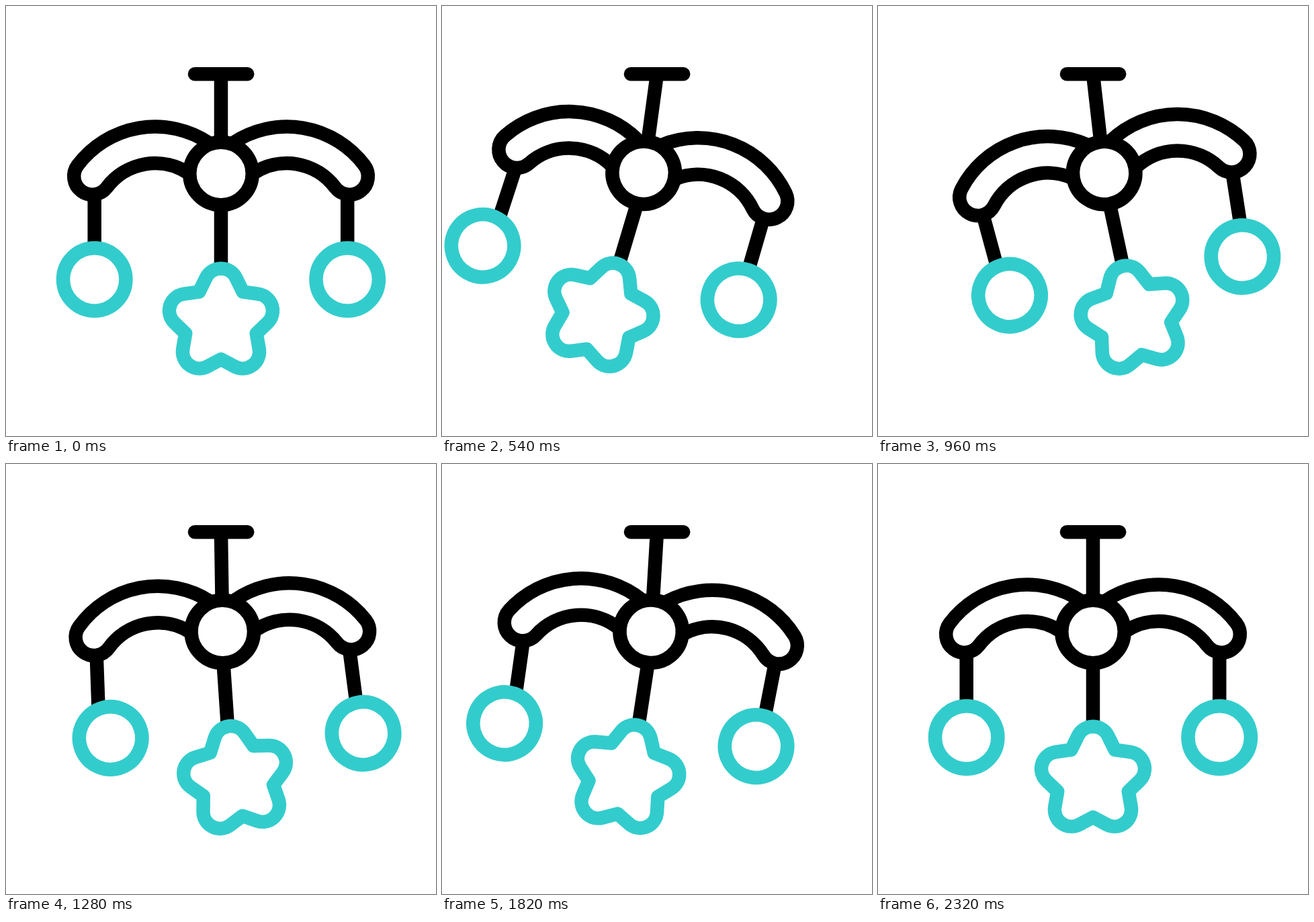
Recreate the animation shown at these times as an HTML page with a canvas. Size 640 by 640 pixels, loop 2400 ms.

```html
<!DOCTYPE html>
<html lang="en">
<head>
<meta charset="utf-8">
<title>Baby mobile</title>
<style>
html, body { margin: 0; width: 100%; height: 100%; overflow: hidden; background: #fff; }
canvas { display: block; width: 640px; height: 640px; }
</style>
</head>
<body>
<canvas id="stage" width="640" height="640"></canvas>
<script>
const ctx = document.getElementById("stage").getContext("2d");
const LOOP = 2400, END = 2320, TAU = Math.PI * 2;
const BLACK = "#000", TEAL = "#33cccc";
const PEAKS = [0, 548, 1049, 1550, 2060];

// Each part trails its parent by a delay (ms) and swings to three peaks (degrees).
const SWINGS = {
  stem: [0, 7.7, -7.6, 7.6],
  leftString: [0, 6.5, -6.4, 6.4],
  leftBall: [130, 13.7, -22, 13.9],
  midString: [75, 5.3, -4.8, 5.2],
  star: [170, 5.3, -5.6, 4.9],
  rightString: [185, 6.4, -6.4, 6.3],
  rightBall: [340, 5.4, -5.8, 5.2]
};

function swing(name, time) {
  const [delay, ...peaks] = SWINGS[name];
  const values = [0, ...peaks, 0];
  const keys = PEAKS.map(key => Math.min(key + delay, END));
  if (time <= keys[0] || time >= keys[4]) return 0;
  const i = keys.findIndex(key => key > time) - 1;
  const u = (time - keys[i]) / (keys[i + 1] - keys[i]);
  const eased = (1 - Math.cos(Math.PI * u)) / 2;
  return values[i] + (values[i + 1] - values[i]) * eased;
}

// Draws inside a frame rotated about (x, y).
function rotated(x, y, degrees, draw) {
  ctx.save();
  ctx.translate(x, y);
  ctx.rotate(degrees * Math.PI / 180);
  ctx.translate(-x, -y);
  draw();
  ctx.restore();
}

function line(x1, y1, x2, y2, cap = "round") {
  ctx.strokeStyle = BLACK;
  ctx.lineCap = cap;
  ctx.beginPath();
  ctx.moveTo(x1, y1);
  ctx.lineTo(x2, y2);
  ctx.stroke();
}

function ring(x, y, color) {
  ctx.strokeStyle = color;
  ctx.fillStyle = "#fff";
  ctx.beginPath();
  ctx.arc(x, y, 46.7, 0, TAU);
  ctx.fill();
  ctx.stroke();
}

function arm() {
  const cx = 222, cy = 324, mid = 117.2, half = 27.25;
  const tip = Math.atan2(253.5 - cy, 128.5 - cx);
  ctx.strokeStyle = BLACK;
  ctx.lineCap = "round";
  ctx.beginPath();
  ctx.arc(cx, cy, mid + half, -0.984, tip, true);
  ctx.arc(cx + mid * Math.cos(tip), cy + mid * Math.sin(tip), half, tip, tip + Math.PI, true);
  ctx.arc(cx, cy, mid - half, tip, -0.98);
  ctx.stroke();
}

function star() {
  const cx = 320, cy = 470.3, outer = 111.3, inner = 55.5;
  const point = (i, r) => {
    const a = -Math.PI / 2 + i * Math.PI / 5;
    return [cx + r * Math.cos(a), cy + r * Math.sin(a)];
  };
  ctx.strokeStyle = TEAL;
  ctx.beginPath();
  ctx.moveTo(...point(-1, inner));
  for (let i = 0; i < 10; i += 2) {
    const notch = point(i + 1, inner);
    ctx.arcTo(...point(i, outer), ...notch, 25);
    ctx.lineTo(...notch);
  }
  ctx.closePath();
  ctx.stroke();
}

function hangingBall(x, stringAngle, ballAngle) {
  rotated(x, 280.5, stringAngle, () => {
    line(x, 281, x, 359, "butt");
    rotated(x, 355, ballAngle, () => ring(x, 407, TEAL));
  });
}

function draw(time) {
  const angle = name => swing(name, time);
  const stem = angle("stem");
  ctx.fillStyle = "#fff";
  ctx.fillRect(0, 0, 640, 640);
  ctx.lineWidth = 20.5;
  ctx.lineJoin = "round";

  line(281, 101.3, 359.2, 101.3);
  rotated(320, 101.3, stem, () => {
    line(320, 101.3, 320, 200);
    rotated(320, 249.5, stem / 2, () => {
      arm();
      ctx.save();
      ctx.translate(640, 0);
      ctx.scale(-1, 1);
      arm();
      ctx.restore();
      hangingBall(131.7, angle("leftString"), angle("leftBall"));
      hangingBall(508.2, angle("rightString"), angle("rightBall"));
      ring(320, 249.5, BLACK);
      rotated(320, 292, angle("midString"), () => {
        line(320, 298, 320, 391, "butt");
        rotated(320, 383, angle("star"), star);
      });
    });
  });
}

function tick() {
  draw(performance.now() % LOOP);
  requestAnimationFrame(tick);
}
tick();
</script>
</body>
</html>
```
